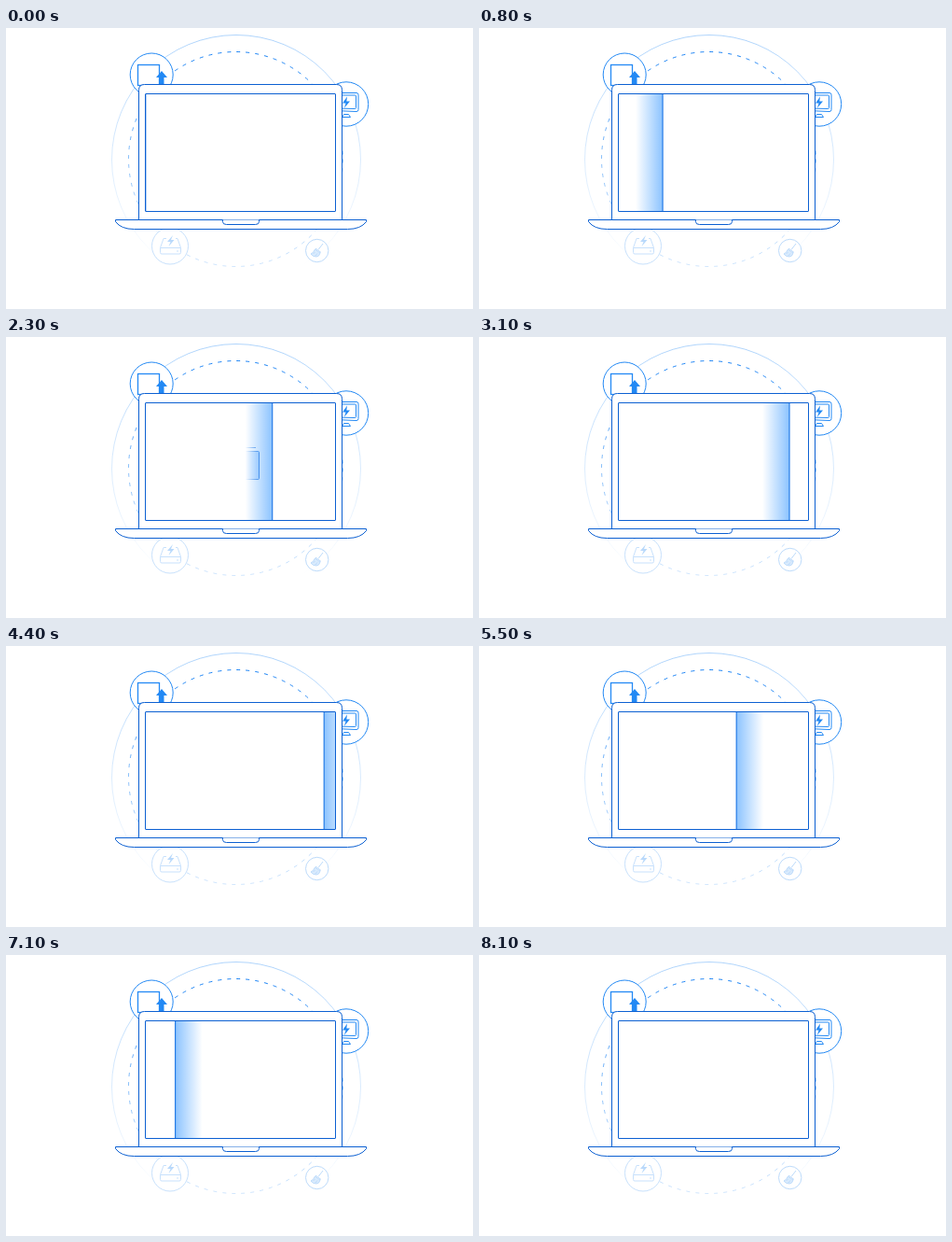
An HTML page for the animation above (8.4 s loop, 501x301 px).

```html
<!DOCTYPE html>
<html lang="en">
<head>
<meta charset="utf-8">
<title>Laptop scan</title>
<style>
  html, body { margin: 0; width: 100%; height: 100%; overflow: hidden; background: #fff; }
  svg { display: block; width: 501px; height: 301px; }
</style>
</head>
<body>
<svg viewBox="0 0 501 301" fill="none">
  <defs>
    <linearGradient id="orbitFade" gradientUnits="userSpaceOnUse" x1="0" y1="7" x2="0" y2="256">
      <stop stop-color="#2188f5" stop-opacity=".36"/>
      <stop offset="1" stop-color="#2188f5" stop-opacity="0"/>
    </linearGradient>
    <linearGradient id="dashFade" gradientUnits="userSpaceOnUse" x1="0" y1="25" x2="0" y2="256">
      <stop stop-color="#1680f4"/>
      <stop offset=".5" stop-color="#1680f4" stop-opacity=".5"/>
      <stop offset="1" stop-color="#1680f4" stop-opacity=".2"/>
    </linearGradient>
    <linearGradient id="beamFade">
      <stop stop-color="#3898ff" stop-opacity="0"/>
      <stop offset="1" stop-color="#3898ff" stop-opacity=".58"/>
    </linearGradient>
    <linearGradient id="maskFade">
      <stop stop-color="#fff" stop-opacity="0"/>
      <stop offset=".7" stop-color="#fff"/>
    </linearGradient>
    <clipPath id="screen"><rect x="150" y="71" width="203" height="125"/></clipPath>
    <mask id="beamMask" maskUnits="userSpaceOnUse" x="0" y="0" width="501" height="301">
      <rect class="beam" x="-29" y="71" width="29" height="125" fill="url(#maskFade)"/>
    </mask>
  </defs>

  <circle cx="247" cy="141" r="133.5" stroke="url(#orbitFade)"/>
  <circle cx="246.5" cy="140.5" r="115" stroke="url(#dashFade)" stroke-dasharray="4 6.04"/>

  <!-- Upgrade badge -->
  <g stroke="#2389f4" fill="#fff">
    <circle cx="156.2" cy="50" r="23"/>
    <rect x="141.5" y="39.5" width="23" height="22" stroke-width="1.3"/>
    <path d="M167 46l6 7h-3.5v9h-5v-9H161z" fill="#2389f4" stroke="none"/>
  </g>

  <!-- Monitor badge -->
  <g stroke="#2389f4" fill="#fff">
    <circle cx="365" cy="81.5" r="23.7"/>
    <path d="M352 69.5h24q2 0 2 2v16q0 2-2 2l-24-1z"/>
    <path d="M354 72h20.5q1 0 1 1v12.5q0 1-1 1L354 86z"/>
    <path d="M362.5 92.5h5l2 3h-9z"/>
    <path d="M366 73.5l-5 7h3.5l-1.5 5 6-7h-3.7z" fill="#2389f4" stroke="none"/>
  </g>

  <!-- Drive badge -->
  <g stroke="#c8e1fc" fill="#fff">
    <circle cx="176" cy="233.5" r="19.5"/>
    <path d="M172 225.5h-3l-3.5 10v5q0 1.5 1.5 1.5h19q1.5 0 1.5-1.5v-5l-3.5-10h-2M165.5 235.5h22M183 239h2"/>
    <path d="M179 222l-6 7h3.5l-2 5 6-7h-3.5z" fill="#b9d9fb" stroke="none"/>
  </g>

  <!-- Broom badge -->
  <g stroke="#bddbfb" fill="#fff">
    <circle cx="333.7" cy="238.5" r="12.2"/>
    <path d="M340 231l-5 6.5M332 236l6 4.5"/>
    <path d="M331.5 237l5.5 4q-1 4-4 4-4 0-6-3 3-1 4.500-5zM329.500 242l2-2M332 244l2-2.500" fill="#d9ebfd"/>
  </g>

  <!-- Laptop -->
  <g stroke="#0c60d2" fill="#fff">
    <path d="M142.500 205.500V66.500q0-6 6-6h206q6 0 6 6v139"/>
    <rect x="149.500" y="70.500" width="204" height="126" rx=".5"/>
    <path d="M117.500 205.500h269v2q-6 8-20 8h-229q-14 0-20-8z"/>
    <path d="M232.500 205.500v2q0 3 4 3h31q4 0 4-3v-2"/>
  </g>

  <g clip-path="url(#screen)">
    <g class="beam">
      <rect x="-29" y="71" width="29" height="125" fill="url(#beamFade)"/>
      <path d="M0 71V196" stroke="#1873e4" stroke-width="1.100"/>
    </g>
    <g mask="url(#beamMask)" stroke="#1873e4">
      <rect x="231.500" y="122.500" width="40" height="30" rx="1" fill="#3898ff" fill-opacity=".4"/>
      <path d="M235 118.500h33"/>
    </g>
  </g>
</svg>
<script>
  const LOOP = 8400, STEP = 100, TURN = 4200;
  const SPEED = 0.0591; // px per ms
  const LEFT = 150, RIGHT = 353;
  const beams = document.querySelectorAll('.beam');

  function draw(now) {
    const time = Math.floor((now % LOOP) / STEP) * STEP;
    const forward = time < TURN;
    const x = forward ? LEFT - 0.2 + time * SPEED : RIGHT - (time - TURN) * SPEED;
    const transform = `translate(${x.toFixed(2)} 0) scale(${forward ? 1 : -1} 1)`;
    beams.forEach(beam => beam.setAttribute('transform', transform));
    requestAnimationFrame(draw);
  }
  draw(0);
</script>
</body>
</html>
```
